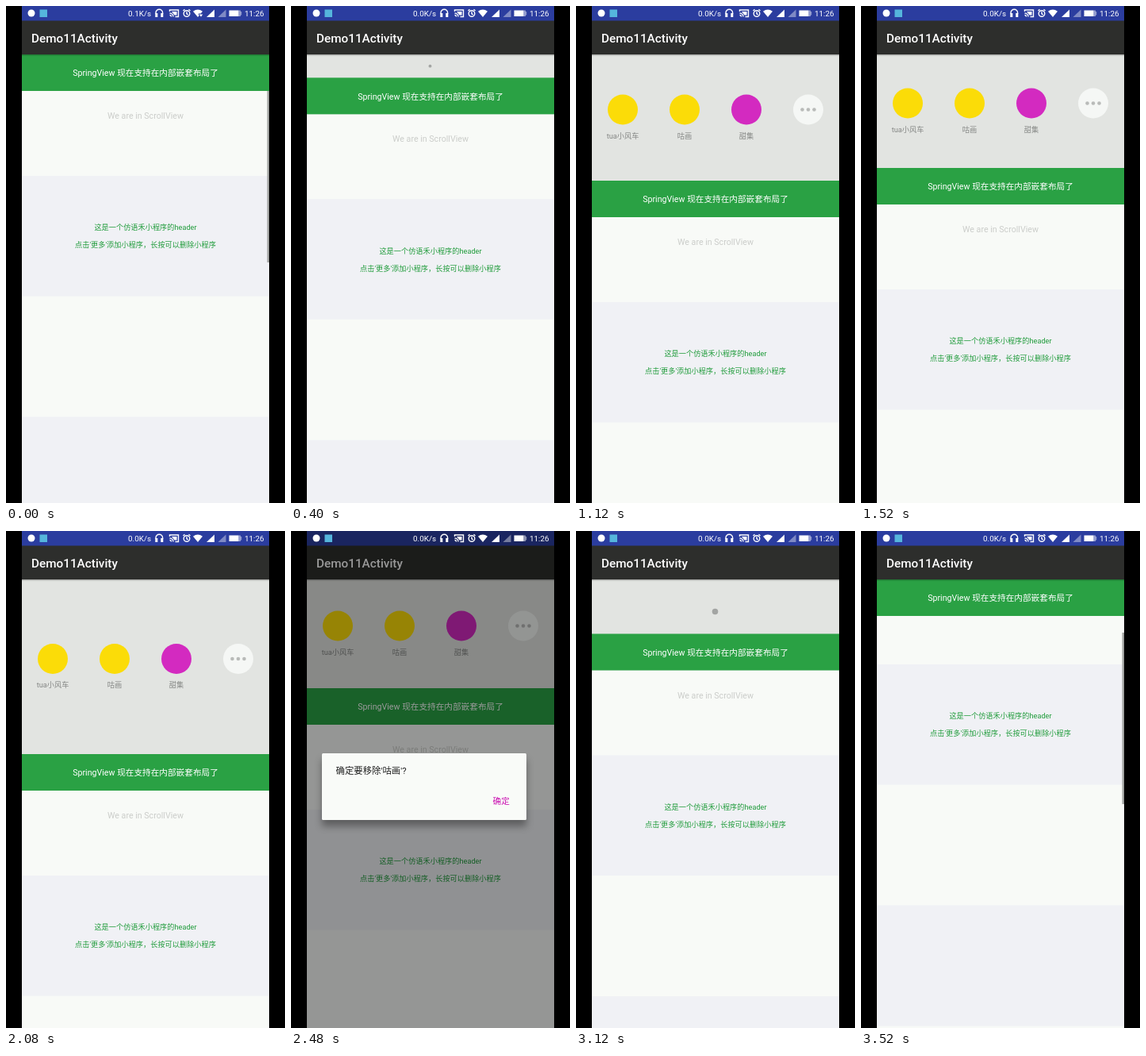
These frames come from a looping animation (352x626 px, 3.6 s). An HTML page:

```html
<!DOCTYPE html>
<html lang="zh-CN">
<head>
<meta charset="utf-8">
<title>Pull-down header</title>
<style>
html, body { margin: 0; width: 100%; height: 100%; overflow: hidden; background: #000; }
svg { display: block; width: 352px; height: 626px; font-family: Roboto, "Noto Sans CJK SC", sans-serif; }
.mid { text-anchor: middle; }
.small { font-size: 9.2px; }
.body { font-size: 10.65px; }
.white { fill: #fff; }
.line { fill: none; stroke: #fff; stroke-width: 1.4; }
.label { fill: #858785; }
.note { fill: #219c3c; }
#dialog { filter: drop-shadow(0 8px 5px rgba(0,0,0,.35)); }
</style>
</head>
<body>
<svg viewBox="0 0 352 626">
  <clipPath id="screen"><path d="M20 0h312v626H20z"/></clipPath>
  <g clip-path="url(#screen)">
    <rect x="20" y="61" width="312" height="565" fill="#e2e4e1"/>

    <g id="dots" fill="#a3a5a3"><circle/><circle/><circle/></g>

    <g id="row" class="small mid label">
      <g><circle r="19" fill="#fbdc08"/><text y="36">tua小风车</text></g>
      <g><circle r="19" fill="#fbdc08"/><text y="36">咕画</text></g>
      <g><circle r="19" fill="#d32ac0"/><text y="36">甜集</text></g>
      <g><circle r="19" fill="#f5f7f5"/>
        <g fill="#b9bbb9"><circle cx="-7.5" r="2.3"/><circle r="2.3"/><circle cx="7.5" r="2.3"/></g></g>
    </g>

    <g id="pane">
      <rect x="20" y="107" width="312" height="620" fill="#f8faf7"/>
      <g id="scroll" class="mid">
        <path d="M20 214h312v151.500H20zM20 517.500h312v152H20z" fill="#f0f1f5"/>
        <text class="body" x="176" y="142" fill="#cbcdca">We are in ScrollView</text>
        <text class="small note" x="176" y="282.300">这是一个仿语禾小程序的header</text>
        <text class="small note" x="176" y="304.300">点击'更多'添加小程序，长按可以删除小程序</text>
      </g>
      <rect id="bar" x="329.500" y="107" width="2.500" height="216" fill="#a3a5a3"/>
      <rect x="20" y="61" width="312" height="46" fill="#2aa144"/>
      <text class="body mid white" x="176" y="88.300">SpringView 现在支持在内部嵌套布局了</text>
    </g>

    <rect x="20" y="61" width="312" height="1.500" fill="#000" opacity=".22"/>
    <rect x="20" y="18" width="312" height="43" fill="#2d2e2c"/>
    <text class="white" x="32" y="45.800" font-size="15.300" font-weight="500">Demo11Activity</text>
    <rect x="20" width="312" height="18.500" fill="#2b3d9f"/>
    <rect id="dim" x="20" width="312" height="626"/>

    <g id="status" class="white">
      <circle cx="32" cy="9" r="4.500"/>
      <rect x="42.500" y="4.500" width="9.500" height="9.500" fill="#55b5dc"/>
      <text id="speed" x="154" y="12.800" font-size="9.900"></text>
      <path class="line" d="M189 10V8.500a4.300 4.300 0 0 1 8.600 0V10"/>
      <path d="M188.300 9h3v5h-3zM195.300 9h3v5h-3z"/>
      <path class="line" stroke-width="1.100" d="M206.500 7V5h11v8.500h-4M206.500 9a4.500 4.500 0 0 1 4.500 4.500M206.500 11.500a2 2 0 0 1 2 2"/>
      <path d="M209 7h6.500v4.500h-3z"/>
      <circle class="line" cx="228" cy="9.500" r="3.800"/>
      <path class="line" stroke-width="1" d="M228 7.300v2.500l1.700 1M223.500 6l2-1.700M232.500 6l-2-1.700"/>
      <path d="M242 14l-6-7.300q6-4.400 12 0z"/>
      <path id="traffic" d="M243 10h6l-3 4.500z" stroke="#2b3d9f"/>
      <path d="M253 14l10-9.500V14z"/>
      <path d="M267.500 14l10-9.500V14z" opacity=".4"/>
      <path d="M281.500 5.500h12v7.500h-12z"/>
      <path d="M293.500 5.500h2.500v1.500h1.200v4.500H296V13h-2.500z" opacity=".5"/>
      <text x="301" y="12.800" font-size="9.900">11:26</text>
    </g>

    <g id="dialog">
      <rect x="39" y="280" width="258" height="84" rx="1.500" fill="#f9fbf8"/>
      <text x="56.500" y="306.300" font-size="11.400" fill="#222">确定要移除'咕画'?</text>
      <text class="body" x="254.500" y="344" fill="#cb12b2">确定</text>
    </g>
  </g>
</svg>
<script>
const LOOP = 3600, STEP = 80, OPEN = 137;
const $ = id => document.getElementById(id);
const clamp = v => Math.max(0, Math.min(1, v));
const move = (el, x, y) => el.setAttribute('transform', `translate(${x} ${y})`);
const fade = (el, v) => el.setAttribute('opacity', v);

// Linear interpolation through [time, value] points.
function track(points, t) {
  const i = points.findIndex(p => p[0] > t);
  if (i < 0) return points[points.length - 1][1];
  if (i === 0) return points[0][1];
  const [t0, a] = points[i - 1], [t1, b] = points[i];
  return a + (b - a) * (t - t0) / (t1 - t0);
}

const PULL = [[0, 0], [80, 2], [320, 13], [560, 62], [720, 97], [960, 145], [1120, 159],
  [1280, OPEN], [1440, OPEN], [1520, 143], [1680, 182], [1920, 212], [2080, 220],
  [2320, OPEN], [2960, OPEN], [3280, 0]];
const SCROLL = [[3360, 0], [3440, 28], [3520, 46]];
const DIM = [[2320, 0], [2480, .4], [2640, .4], [2720, .25], [2800, .07], [2880, 0]];
const DIALOG = [[2320, 0], [2480, 1], [2640, 1], [2720, 0]];
const BAR = [[0, 1], [160, 1], [400, 0], [3280, 0], [3360, 1]];

function drawDots(pull) {
  const spread = clamp((pull - 60) / 37);
  const y = 61 + Math.max(pull / 2, pull - 28);
  [...$('dots').children].forEach((dot, i) => {
    dot.setAttribute('cx', 175.5 + (i - 1) * 13.5 * spread);
    dot.setAttribute('cy', y);
    dot.setAttribute('r', i === 1 ? 4 * clamp(pull / 60) - spread : 2.3 * spread);
  });
  fade($('dots'), clamp((130 - pull) / 33));
}

function drawRow(pull, t) {
  const y = 51 + pull / 2 - 1.475 * Math.max(0, OPEN - pull);
  const removed = t >= 2720, closedUp = t >= 2880;
  [...$('row').children].forEach((item, i) => {
    const slot = closedUp && i > 1 ? i - 1 : i;
    move(item, 59 + 78 * slot, y);
    fade(item, removed && i === 1 ? 0 : 1);
  });
}

function draw(t) {
  const pull = track(PULL, t), scroll = track(SCROLL, t);
  drawDots(pull);
  drawRow(pull, t);
  move($('pane'), 0, pull);
  move($('scroll'), 0, -scroll);
  move($('bar'), 0, scroll * 21 / 46);
  fade($('bar'), track(BAR, t));
  fade($('dim'), track(DIM, t));
  fade($('dialog'), track(DIALOG, t));
  const busy = t >= 2640 && t < 3040;
  $('speed').textContent = (busy ? '0.3' : t < 400 ? '0.1' : '0.0') + 'K/s';
  fade($('traffic'), busy || t < 400 ? 1 : 0);
}

const start = performance.now();
function tick() {
  const t = (performance.now() - start) % LOOP;
  draw(Math.floor(t / STEP) * STEP);
  requestAnimationFrame(tick);
}
tick();
</script>
</body>
</html>
```
